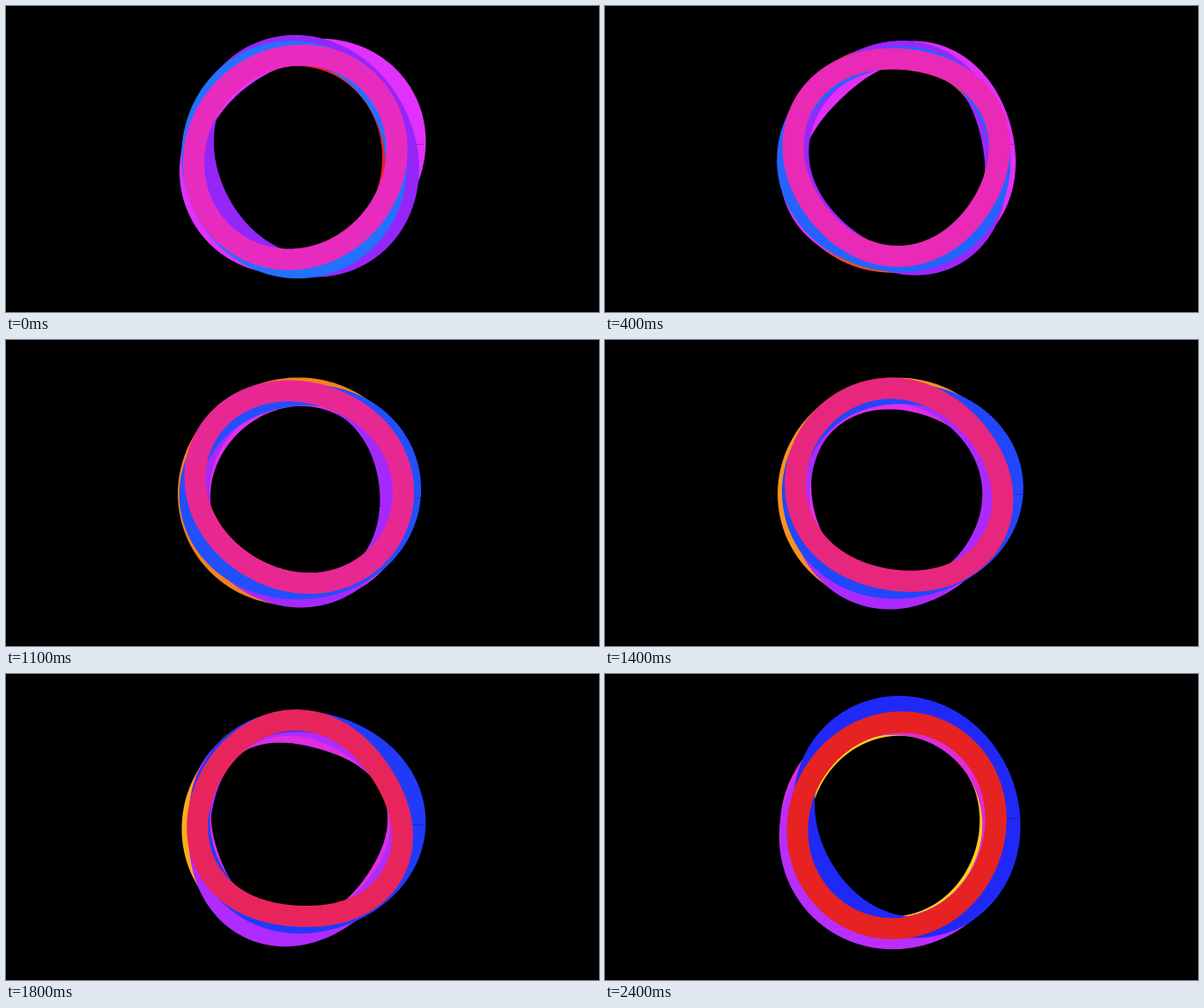
An HTML page with a canvas that plays this animation: 670x346 px, repeating every 2500 ms.

```html
<!DOCTYPE html>
<html lang="en">
<head>
<meta charset="utf-8">
<title>Wobbling rings</title>
<style>
  html, body { margin: 0; width: 100%; height: 100%; overflow: hidden; background: #000; }
  canvas { display: block; width: 670px; height: 346px; }
</style>
</head>
<body>
<canvas id="stage" width="670" height="346"></canvas>
<script>
const LOOP = 2500, STEP = 100, LAST = LOOP - STEP;
const CX = 335, CY = 170, WIDTH = 24, SAMPLES = 144;

// Bottom to top. A shape is [size, shift x, shift y, oval x, oval y]:
// it drifts from one to the other and swells by the bulge halfway.
// The lobe is a three-cornered wobble; the bend eases the colour.
const RINGS = [
  { // amber
    from: [126.4, -9.7, 3.1, -2.6, -1], to: [123, -7.8, 1.7, -2.9, -2.7],
    bulge: [5.8, 0.8, -1.6, 5, 0], lobe: [0, 0],
    colors: ["EA1C28", "FFD018"], bend: 0.75
  },
  { // magenta
    from: [134.7, 0.2, 0, 3.2, -9.5], to: [126.5, -11, 2, -0.3, -0.7],
    bulge: [-7, 2.4, 4.6, -1, 5.9], lobe: [-3, 5],
    colors: ["E231FC", "DE2CD8"], bend: 1, seam: [156, 156]
  },
  { // purple
    from: [131.6, 3.9, -0.7, -4.6, 6.8], to: [134.9, -2.4, 6.2, 0.2, -4],
    bulge: [-9.2, -9, 2.4, -1.4, -0.9], lobe: [-4.5, 0.5],
    colors: ["9426F8", "B92DFE"], bend: 1
  },
  { // blue
    from: [130.6, -9.7, 3.9, -3.5, 2], to: [131.7, 7.2, -9, -4.5, 5.2],
    bulge: [-2.1, 0, 3.9, 11.6, -5.4], lobe: [-2.3, 0.5],
    colors: ["2470FF", "2028F8"], bend: 1, seam: [190, 163]
  },
  { // pink
    from: [126.8, -8.2, 0.5, -0.2, -3.8], to: [126.3, -5.4, 0.9, -2.3, -2.9],
    bulge: [-1.9, 3.8, -5.1, 5.7, 8.5], lobe: [0, -4],
    colors: ["E82BBF", "E62222"], bend: 1.6
  }
];

const ctx = document.getElementById("stage").getContext("2d");
const lerp = (a, b, u) => a + (b - a) * u;
const rgb = hex => [16, 8, 0].map(s => parseInt(hex, 16) >> s & 255);

function mix([a, b], u) {
  const end = rgb(b);
  return `rgb(${rgb(a).map((v, i) => Math.round(lerp(v, end[i], u)))})`;
}

// Outer radius of a ring as a function of the angle
function outline({ from, to, bulge, lobe }, u) {
  const swell = Math.sin(Math.PI * u), sway = Math.sin(2 * Math.PI * u);
  const [size, ...waves] = from.map((v, i) => lerp(v, to[i], u) + bulge[i] * swell);
  waves.push(lobe[0] * sway, lobe[1] * sway);
  return angle => {
    let r = size;
    for (let k = 1; k <= 3; k++) {
      r += waves[2 * k - 2] * Math.cos(k * angle) + waves[2 * k - 1] * Math.sin(k * angle);
    }
    return r;
  };
}

function drawRing(ring, u) {
  const radius = outline(ring, u);
  ctx.beginPath();
  for (let k = 0; k < SAMPLES; k++) {
    const angle = k / SAMPLES * 2 * Math.PI;
    const r = radius(angle) - WIDTH / 2;
    ctx.lineTo(CX + r * Math.cos(angle), CY + r * Math.sin(angle));
  }
  ctx.closePath();
  ctx.lineWidth = WIDTH;
  ctx.strokeStyle = mix(ring.colors, u ** ring.bend);
  ctx.stroke();
  if (ring.seam) drawSeam(CX + radius(0), lerp(...ring.seam, u));
}

// Faint line where the ring's ends join
function drawSeam(edge, y) {
  ctx.fillStyle = "rgba(0, 0, 0, .25)";
  ctx.fillRect(edge - WIDTH + 4, Math.round(y), WIDTH - 5, 1);
}

function draw(now) {
  const u = Math.floor(now % LOOP / STEP) * STEP / LAST;
  ctx.fillStyle = "#000";
  ctx.fillRect(0, 0, 670, 346);
  RINGS.forEach(ring => drawRing(ring, u));
}

ctx.lineJoin = "round";
const start = performance.now();
function tick() {
  draw(performance.now() - start);
  requestAnimationFrame(tick);
}
tick();
</script>
</body>
</html>
```
